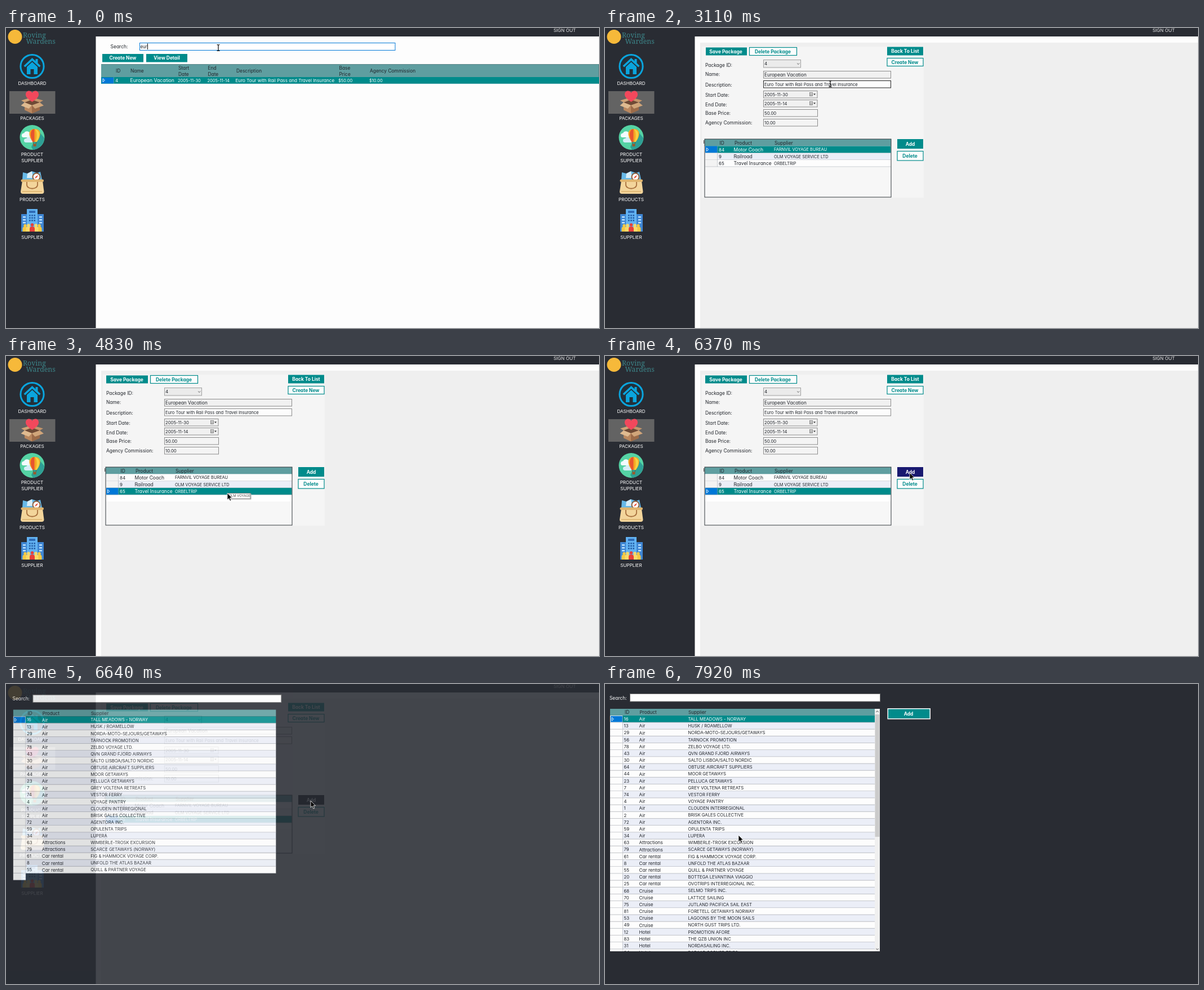
These frames come from a looping animation (1053x532 px, 8 s). An HTML page:

```html
<!DOCTYPE html>
<html lang="en">
<head>
<meta charset="utf-8">
<title>Package manager</title>
<style>
  html, body { margin: 0; width: 100%; height: 100%; overflow: hidden; background: #292c33; }
  svg { display: block; width: 100%; height: 100%; }
  text { font-family: Inter, "Open Sans", sans-serif; font-feature-settings: "cv11"; white-space: pre; }
</style>
</head>
<body>
<svg id="stage" viewBox="0 0 1053 532" preserveAspectRatio="none"></svg>
<script>
const LOOP = 8000;
const DARK = '#292c33', TEAL = '#008b8b', CADET = '#5f9ea0', BLUE = '#0078d7', INK = '#20242a', NAVY = '#191970';
const WHITE = '#fdfdfd', LAVENDER = '#ebeef7';

// Markup helpers; text is placed by its vertical centre.
const rect = (x, y, w, h, fill, more = '') => `<rect x="${x}" y="${y}" width="${w}" height="${h}" fill="${fill}" ${more}/>`;
const path = (d, fill, more = '') => `<path d="${d}" fill="${fill}" ${more}/>`;
const line = (d, color, w = 1) => path(d, 'none', `stroke="${color}" stroke-width="${w}"`);
const disc = (x, y, r, fill, more = '') => `<circle cx="${x}" cy="${y}" r="${r}" fill="${fill}" ${more}/>`;
const group = (id, body, more = '') => `<g id="${id}" ${more}>${body}</g>`;
const label = (x, y, str, size = 8.4, fill = INK, more = '') =>
  `<text x="${x}" y="${(y + size * 0.36).toFixed(2)}" font-size="${size}" fill="${fill}" ${more}>${str.replace(/&/g, '&amp;')}</text>`;
const middle = (x, y, str, size, fill, more = '') => label(x, y, str, size, fill, 'text-anchor="middle" ' + more);
const box = (x, y, w, h, fill, stroke, more = '') => rect(x + 0.5, y + 0.5, w - 1, h - 1, fill, `stroke="${stroke}" ${more}`);
const solid = (x, y, w, h, str, id = '') =>
  rect(x, y, w, h, TEAL, id && `id="${id}"`) + middle(x + w / 2, y + h / 2, str, 8.4, '#fff', 'font-weight="700"');
const outline = (x, y, w, h, str) =>
  box(x, y, w, h, '#fbfdfd', TEAL, 'stroke-width="1.2"') + middle(x + w / 2 - 0.5, y + h / 2, str, 8.4, TEAL, 'font-weight="700"');
const marker = (x, y) => path(`M${x} ${y - 3}l3.4 3l-3.4 3z`, 'none', 'stroke="#fff" stroke-width=".9"');

function sidebar() {
  const brand = (x, y, s) => label(x, y, s, 12.3, '#3c8488', 'style="font-family:\'Noto Serif\',serif"');
  const home = disc(46.5, 68, 20.6, '#23303a', 'stroke="#0aa5de" stroke-width="3"') +
    path('M46.5 53L31.5 67l2.4 2.4L46.5 58l12.6 11.4 2.4-2.4-5-4.7V55h-4v3.6z', '#0aa5de') +
    path('M37 69l9.5-8.8L56 69v13h-6.5v-9h-6v9H37z', '#0aa5de');
  const parcel = rect(6, 112, 81.5, 40, '#636363') +
    path('M33 132l13 5 14-5v13.5l-14 6-13-6z', '#b9875f') + path('M46 137l14-5v13.5l-14 6z', '#9c6b49') +
    path('M33 132l13-5 14 5-14 5z', '#6f4a35') +
    path('M33 132l13 5-5.5 6-14-5.5z', '#dfba90') + path('M60 132l-14 5 5.5 6 15.5-5.5z', '#d0a57a') +
    path('M33 132l13-5-4-3-15 4.5z', '#cfa276') + path('M60 132l-14-5 4-3 16 4.5z', '#c4956a') +
    path('M46.5 131C38 125.5 34.5 121.5 35 117c.6-6 8.5-7.5 11.5-2 3-5.5 11-4 11.5 2 .5 4.5-3 8.5-11.5 14z', '#f2485c');
  const balloon = disc(46.5, 194, 22, '#55d3a4') +
    path('M58 183l10 12a22 22 0 0 1-20 21l-3-5z', '#2e9f95') +
    path('M30 194a4 4 0 0 1 2-7.5 6 6 0 0 1 11 1 3.5 3.5 0 0 1 0 6.5z', '#f2fbff') +
    path('M35 203a3.5 3.5 0 0 1 1-7 5 5 0 0 1 9 1 3 3 0 0 1 0 6z', '#d5eef7') +
    path('M51 179c13 0 11.5 13 3.5 23h-7C39.5 192 38 179 51 179z', '#f5a623') +
    path('M47 180c-5 5-3.5 15 .5 22h3V179z', '#e8542f') + path('M51 179c4 3 5 15 1 23h2.5c6-8 8-20-3.5-23z', '#f7cf42') +
    line('M48 202l1 4M54 202l-1 4', '#7c4a2a', 0.8) + rect(48.5, 205.5, 5, 4.5, '#9a5a2c');
  const bag = path('M30 256l8 2 8-4 9 3 6-2 3 14H29z', '#67b9e8') + path('M38 258l8-4 2 12h-11z', '#d9eef8') +
    disc(54, 264, 7.5, '#8b5e3c') + disc(54, 264, 5.5, '#fff') + path('M51 267l2-4 4-2-2 4z', '#e5533d') +
    path('M29 271h36l2.5 19a4 4 0 0 1-4 4H30a4 4 0 0 1-4-4z', '#f3d59b') +
    rect(26.5, 268.5, 40.5, 4.5, '#e0b56f', 'rx="2"') +
    line('M37 273v5c0 9 19 9 19 0v-5', '#a8713f', 1.8) + line('M29 290h35', '#d0a055', 1);
  let tower = rect(27, 330, 40, 31, '#3f86d3') + rect(37, 321, 19, 40, '#62b2f2') + rect(41, 324, 11, 4, '#2f6db8');
  for (let i = 0; i < 9; i++) tower += rect(41 + i % 3 * 4.2, 331 + Math.floor(i / 3) * 4.5, 2.6, 2.6, '#245ea6');
  for (let i = 0; i < 6; i++) tower += rect(i % 2 ? 59 : 30, 334 + (i >> 1) * 5, 5, 2.4, '#bfe3ff');
  const person = (x, y, c) => disc(x, y, 2.7, c) + path(`M${x - 4.5} 361v-5q0-4 4.5-4t4.5 4v5z`, c);
  tower += person(34, 350.5, '#f6c945') + person(59, 350.5, '#f6c945') + person(40, 350, '#f9da6b') + person(53, 350, '#f9da6b') + person(46.5, 349, '#e8403a');
  const names = [[98, 'DASHBOARD'], [160, 'PACKAGES'], [224, 'PRODUCT'], [235.5, 'SUPPLIER'], [304, 'PRODUCTS'], [371.5, 'SUPPLIER']];
  return disc(16, 15.5, 12.5, '#f6b93a') + brand(30, 13, 'Roving') + brand(35.5, 23.5, 'Wardens') +
    home + parcel + balloon + bag + tower +
    names.map(([y, s]) => middle(46.5, y, s, 8.1, '#fff')).join('') + middle(992, 4.5, 'SIGN OUT', 8.2, '#e8e8ea');
}

function listPage() {
  const heads = [[195, 76, 'ID'], [221, 76, 'Name'], [306, 70.5, 'Start'], [306, 81.5, 'Date'], [358.5, 70.5, 'End'], [358.5, 81.5, 'Date'],
    [409, 76, 'Description'], [591.5, 70.5, 'Base'], [591.5, 81.5, 'Price'], [646, 76, 'Agency Commission']];
  const cells = [[194, '4', 8], [220.5, 'European Vacation', 8.7], [305, '2005-11-30', 7.5], [357.5, '2005-11-14', 7.5],
    [407.5, 'Euro Tour with Rail Pass and Travel Insurance', 8.1], [590, '$50.00', 7.5], [645, '$10.00', 7.5]];
  return label(185.5, 33, 'Search:', 8.5) + box(237, 26, 454.5, 14, '#fff', BLUE, 'id="field"') + label(238.5, 33.2, 'eur', 7.9) +
    rect(251, 27.5, 1, 10.5, '#000', 'id="caret"') + rect(370, 40.5, 41, 23, '#f0f0f0', 'id="patch"') +
    solid(171, 46, 73, 14.5, 'Create New') + solid(249, 46, 73, 14.5, 'View Detail') +
    rect(169, 64, 884, 23, CADET) + line('M169 64.5H1052.5V99', '#5a7f80', 0.8) +
    rect(169, 87, 884, 12, TEAL) + rect(170, 87.8, 21, 10.6, BLUE) + line('M170 98.7H1052M191.5 87V99', '#8fb5c0', 0.5) + marker(172, 92.7) +
    heads.map(([x, y, s]) => label(x, y, s, 8.4)).join('') + cells.map(([x, s, z]) => label(x, 93.3, s, z, '#fff')).join('');
}

const booked = [['84', 'Motor Coach', 'FARNVIL VOYAGE BUREAU'], ['9', 'Railroad', 'OLM VOYAGE SERVICE LTD'], ['65', 'Travel Insurance', 'ORBELTRIP']];

function bookedRows(sel) {
  let out = sel ? rect(178, 246, 329.5, 12, '#fff') : '';
  booked.forEach((cells, i) => {
    const y = 209.5 + i * 12.2, on = i === sel, ink = on ? '#fff' : INK;
    out += rect(178, y, 329.5, 12.2, on ? TEAL : i % 2 ? LAVENDER : WHITE) +
      rect(178, y, 21.5, 12.2, on ? BLUE : '#f3f3f3') + line(`M178 ${y + 12}H507.5M199.5 ${y}v12.2`, '#9da2a8', 0.5) +
      (on ? marker(180.5, y + 6) : '') + label(202, y + 6.2, cells[0], 7.9, ink) +
      label(228.5, y + 6.2, cells[1], 8.5, ink) + label(300, y + 6.2, cells[2], 7.4, ink);
  });
  return group('sel' + sel, out);
}

function detailPage() {
  const grey = '#8c8c8c';
  const date = (y, s) => box(281, y, 96.5, 13.5, '#f1f1f1', grey) + label(283, y + 6.9, s, 7.7) +
    box(363, y + 3, 6, 7, '#ddd', '#777', 'stroke-width=".8"') + line(`M364 ${y + 6}h4M364 ${y + 8}h4`, '#777', 0.6) + path(`M370 ${y + 5.5}h4l-2 2.5z`, '#333');
  const fields = box(281, 56, 67, 14.5, '#ebebeb', '#a0a0a0') + label(283, 63.4, '4', 8) + line('M341 62.5l2.2 2 2.2-2', '#555', 0.9) +
    box(281, 76, 227, 13.5, '#f1f1f1', grey) + label(283, 83.2, 'European Vacation', 8.3) +
    box(281, 93, 227, 13.5, '#fcfcfc', grey, 'id="desc"') + label(283, 100.2, 'Euro Tour with Rail Pass and Travel Insurance', 7.65) +
    date(111, '2005-11-30') + date(127, '2005-11-14') +
    [[144, '50.00'], [161, '10.00']].map(([y, s]) => box(281, y, 97, 13.5, '#f4f4f4', grey) + label(283, y + 7, s, 7.8)).join('');
  const names = [[65.5, 'Package ID:'], [82, 'Name:'], [100.5, 'Description:'], [118.5, 'Start Date:'], [135.5, 'End Date:'], [151, 'Base Price:'], [168, 'Agency Commission:']];
  const form = names.map(([y, s]) => label(178, y, s, 8.4)).join('') +
    rect(178, 34.5, 74, 14, TEAL, 'id="save"') + middle(214.5, 41.7, 'Save Package', 8.4, '#fff', 'font-weight="700"') +
    outline(256, 34, 85, 15, 'Delete Package') + solid(501, 33.5, 64, 15, 'Back To List') + outline(500.5, 53, 65, 15, 'Create New') +
    solid(519, 197, 46, 17, 'Add', 'add') + outline(518.5, 218, 47, 17.5, 'Delete') +
    line('M175.7 199v6', '#333', 1) + rect(177, 197, 331, 103, '#f7f7f7') + rect(177, 197, 331, 12.5, CADET) +
    label(203.5, 203.6, 'ID') + label(230, 203.6, 'Product') + label(301, 203.6, 'Supplier') +
    bookedRows(0) + bookedRows(1) + bookedRows(2) + rect(177, 197, 331, 103, 'none', 'stroke="#33383c"');
  return rect(169, 26, 884, 506, '#efefef') + rect(172, 33, 394, 268, '#f5f5f5') + fields + group('form', form) +
    group('tip', rect(394, 244, 41.5, 10.5, '#b8b8b8') + box(393, 243, 41.5, 10.5, '#fff', '#8a8a8a') + label(395.5, 248.3, 'OLM VOYAGE', 5.9, '#555'));
}

const ids = [16, 13, 29, 56, 78, 43, 30, 64, 44, 23, 7, 74, 4, 1, 2, 72, 59, 34, 63, 79, 61, 8, 55, 20, 25, 68, 70, 75, 81, 53, 49, 12, 83, 31, 24];
const kinds = [[18, 'Air'], [20, 'Attractions'], [25, 'Car rental'], [31, 'Cruise'], [35, 'Hotel']];
const firms = `TALL MEADOWS - NORWAY|HUSK / ROAMELLOW|NORDA-MOTO-SEJOURS/GETAWAYS|TARNOCK PROMOTION|ZELBO VOYAGE LTD.|QVN GRAND FJORD AIRWAYS|SALTO LISBOA/SALTO NORDIC|OBTUSE AIRCRAFT SUPPLIERS|MOOR GETAWAYS|PELLUCA GETAWAYS|GREY VOLTENA RETREATS|VESTOR FERRY|VOYAGE PANTRY|CLOUDEN INTERREGIONAL|BRISK GALES COLLECTIVE|AGENTORA INC.|OPULENTA TRIPS|LUPERA|WIMBERLE-TROSK EXCURSION|SCARCE GETAWAYS (NORWAY)|FIG & HAMMOCK VOYAGE CORP.|UNFOLD THE ATLAS BAZAAR|QUILL & PARTNER VOYAGE|BOTTEGA LEVANTINA VIAGGIO|OVOTRIPS INTERREGIONAL INC.|SELMO TRIPS INC.|LATTICE SAILING|JUTLAND PACIFICA SAIL EAST|FORETELL GETAWAYS NORWAY|LAGOONS BY THE MOON SAILS|NORTH GUST TRIPS LTD.|PROMOTION AFORE|THE QZB UNION INC|NORDASAILING INC.|BAZAAR CORNER TRIPS`.split('|');

function dialog() {
  const rows = firms.map((firm, i) => {
    const y = 56 + i * 12.18, c = y + 6.2, on = !i, ink = on ? '#fff' : INK;
    const kind = kinds.find(k => i < k[0])[1];
    const head = rect(9, y, 22.5, 12.18, WHITE) + line(`M9 ${y + 11.9}H31.5V${y}`, '#a4a8b0', 0.6) +
      (on ? rect(10, y + 0.8, 20.8, 10.6, BLUE) + marker(12, c) : '');
    const body = rect(31.5, y, 447.5, 12.18, on ? TEAL : i % 2 ? LAVENDER : WHITE) + line(`M31.5 ${y + 11.9}H479`, '#a4a8b0', 0.6) +
      label(33.5, c, String(ids[i]), 7.8, ink) + label(60.5, c, kind, 8.2, ink) + label(147.5, c, firm, 7.7, ink);
    return group('head' + i, head) + group('body' + i, body);
  }).join('');
  const extra = rect(479, 44, 9, 430, '#f0f0f0') + rect(479.5, 54, 8, 217, '#cbcbcb') +
    line('M481.3 50l2.2-2.2 2.2 2.2M481.3 469l2.2 2.2 2.2-2.2', '#444', 1) +
    rect(501.5, 43, 76.5, 19.5, '#fff') + rect(503, 44.5, 73.5, 16.5, TEAL) + middle(539, 53, 'Add', 8.4, '#fff', 'font-weight="700"');
  return rect(-10, -30, 1073, 600, DARK) + label(8, 24.7, 'Search:', 8.4, '#fff') + box(44, 17, 445, 14.5, '#fff', '#7a7a7a') +
    `<clipPath id="view"><rect x="9" y="43.5" width="479" height="430.5"/></clipPath>` +
    `<g clip-path="url(#view)">` + rect(9, 44, 470, 12, CADET) + label(35, 50.2, 'ID') + label(61.5, 50.2, 'Product', 8.2) + label(148, 50.2, 'Supplier', 8.2) + rows + '</g>' +
    group('extra', extra);
}

const stage = document.getElementById('stage');
stage.innerHTML = rect(0, 0, 1053, 532, DARK) + sidebar() + rect(159.5, 15, 893.5, 517, WHITE) +
  group('list', listPage()) + group('detail', detailPage()) + group('dialog', dialog()) +
  group('arrow', path('M0 0V12L2.8 9.5 4.8 14 6.8 13.2 4.8 8.8H8.5Z', '#000', 'stroke="#fff" stroke-width=".8"')) +
  group('beam', line('M-2.5-5.5Q0-5.5 0-4.5Q0-5.5 2.5-5.5M0-4.5V4.5M-2.5 5.5Q0 5.5 0 4.5Q0 5.5 2.5 5.5', '#000', 1.2));

const el = {};
stage.querySelectorAll('[id]').forEach(n => { el[n.id] = n; });
const show = (id, on) => { el[id].style.display = on ? '' : 'none'; };
const set = (id, key, value) => el[id].setAttribute(key, value);
const at = (track, t) => track.reduce((last, k) => (k[0] <= t ? k : last));

const pointer = [
  [0, 377, 35, 'beam'], [1110, 379, 35, 'beam'], [1260, 393, 63], [1410, 399, 82], [1530, 400, 94], [1680, 399, 96], [1800, 400, 97],
  [3110, 400, 99, 'beam'], [3890, 397, 166], [4040, 397, 190], [4160, 395, 212], [4280, 394, 226], [4400, 393, 227], [4830, 393, 243],
  [4950, 490, 224], [5100, 512, 218], [5220, 531, 211], [5340, 540, 207], [5500, 541, 207],
  [7230, 497, 161], [7380, 340, 108], [7500, 215, 73], [7650, 209, 120], [7770, 222, 182], [7920, 237, 268]
];
// Time, opacity, scale and number of painted rows of the opening dialog.
const opening = [[0, 0, 1, 0], [6520, 0.5, 0.975, 11], [6640, 0.87, 0.993, 23], [6790, 1, 1, 35]];
const addFill = [[0, TEAL], [5220, NAVY], [6640, '#0c0c14']];

function draw(t) {
  const [, px, py, kind = 'arrow'] = at(pointer, t);
  show('arrow', kind === 'arrow');
  show('beam', kind === 'beam');
  set(kind, 'transform', `translate(${px} ${py})`);

  show('list', t < 2690);
  show('caret', t < 280 || (t >= 800 && t < 1680));
  show('patch', t >= 1260);
  set('field', 'stroke', t < 1960 ? BLUE : t < 2100 ? '#5c87ab' : '#7a7a7a');

  show('detail', t >= 2690);
  set('form', 'opacity', t < 2840 ? 0 : t < 2960 ? 0.6 : 1);
  set('desc', 'stroke', t >= 3110 && t < 4040 ? '#222' : '#8c8c8c');
  set('save', 'x', t < 4400 ? 179 : 178);
  set('save', 'width', t < 4400 ? 73 : 74);
  const sel = t < 4400 ? 0 : t < 4830 ? 1 : 2;
  for (let i = 0; i < 3; i++) show('sel' + i, i === sel);
  show('tip', t >= 4520 && t < 4950);
  set('add', 'fill', at(addFill, t)[1]);

  const [, alpha, scale, count] = at(opening, t);
  show('dialog', alpha > 0);
  set('dialog', 'opacity', alpha);
  set('dialog', 'transform', `translate(526.5 266) scale(${scale}) translate(-526.5 -266)`);
  show('extra', alpha === 1);
  firms.forEach((_, i) => {
    show('head' + i, i <= count);
    show('body' + i, i < count);
  });
}

const start = performance.now();
function tick() {
  draw((performance.now() - start) % LOOP);
  requestAnimationFrame(tick);
}
tick();
</script>
</body>
</html>
```
